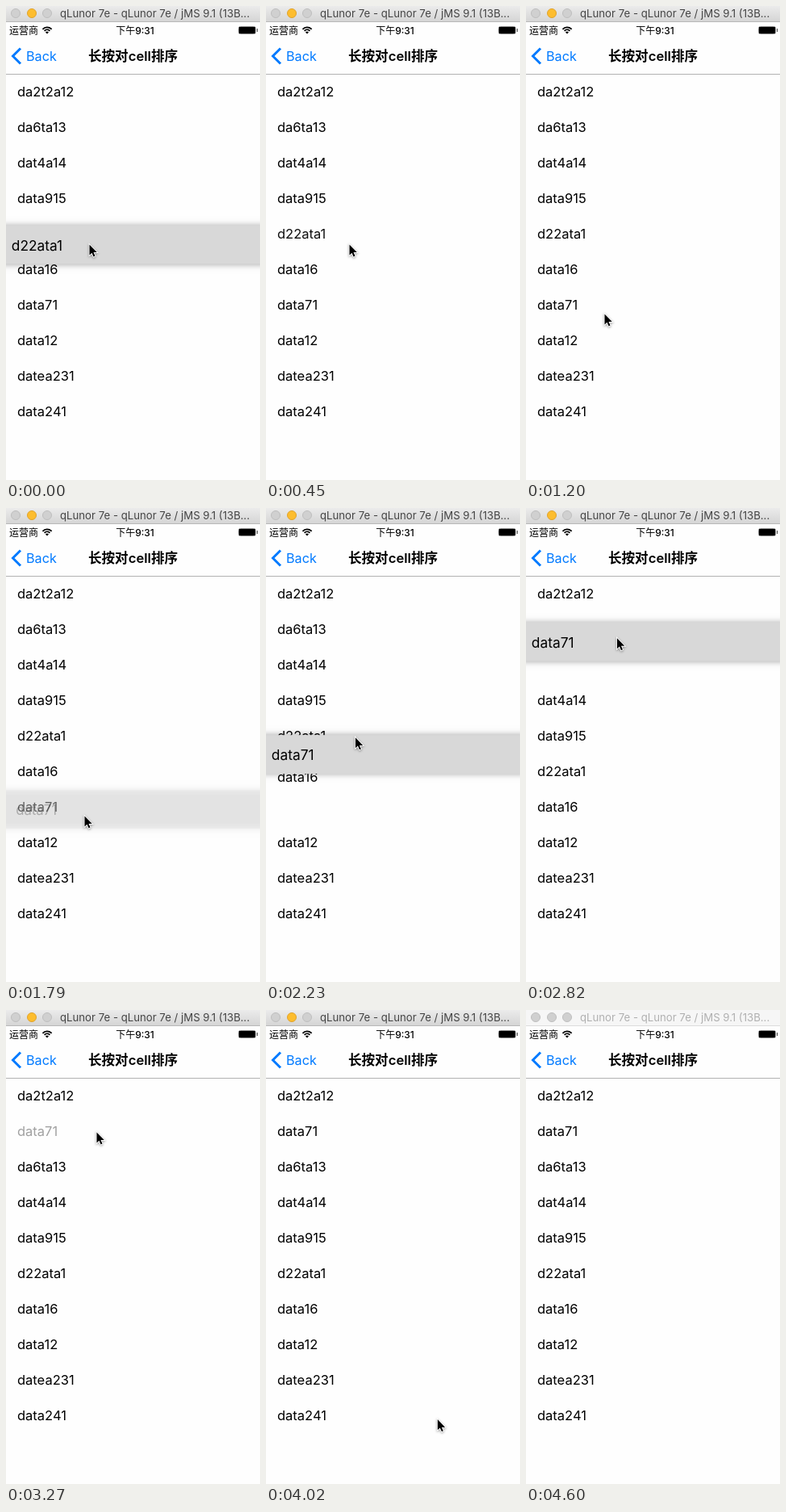
An HTML page with a canvas that plays this animation: 315 by 587 pixels, repeating every 4.7 s.

```html
<!DOCTYPE html>
<html lang="zh">
<head>
<meta charset="utf-8">
<title>Cell sorting</title>
<style>
html, body { margin: 0; height: 100%; overflow: hidden; background: #fefefe; }
canvas { display: block; }
</style>
</head>
<body>
<canvas id="stage" width="315" height="587"></canvas>
<script>
const c = document.getElementById('stage').getContext('2d');
const FONT = 'Inter, "Noto Sans CJK SC", "Noto Sans CJK", sans-serif';
const LOOP = 4700, STEP = 148.6, W = 315, ROW = 44, TOP = 106, SIZE = 16.5;
const SLIDE = 273, FADE = 250;
const DROP_1 = 290, LIFT = 1701, DROP_2 = 3260;
const FIRST = 'd22ata1', SECOND = 'data71';

const names = ['da2t2a12', 'da6ta13', 'dat4a14', 'data915', FIRST,
  'data16', SECOND, 'data12', 'datea231', 'data241'];

// when each row starts to slide one slot down
const slides = { data16: 2160, d22ata1: 2240, data915: 2314, dat4a14: 2441, da6ta13: 2776 };

const clamp = p => Math.min(1, Math.max(0, p));
const mix = (a, b, p) => a + (b - a) * p;
const smooth = p => p * p * (3 - 2 * p);
const out = k => p => 1 - (1 - p) ** k;

// pointer strokes, each from the end of the one before
const start = { x: 103.5, y: 295.5 };
const strokes = [
  { at: 827, dur: 312, x: 97.5, y: 381.5, ex: smooth, ey: out(1.84) },
  { at: 2080, dur: 446, x: 116.5, y: 197, ex: out(3), ey: out(1.84) },
  { at: 2526, dur: 446, x: 112.5, y: 151.5, ex: out(2), ey: out(1.4) },
  { at: 3715, dur: 446, x: 248, y: 561.5, ex: smooth, ey: out(1.84) },
];

function tip(t) {
  let { x, y } = start;
  for (const s of strokes) {
    const p = clamp((t - s.at) / s.dur);
    x = mix(x, s.x, s.ex(p));
    y = mix(y, s.y, s.ey(p));
  }
  return { x, y };
}

function text(s, x, y, size, color = '#000', weight = 400, align = 'left') {
  c.font = `${weight} ${size}px ${FONT}`;
  c.textAlign = align;
  c.fillStyle = color;
  c.fillText(s, x, y);
}

function rect(x, y, w, h, color) {
  c.fillStyle = color;
  c.fillRect(x, y, w, h);
}

function titleBar(active) {
  const g = c.createLinearGradient(0, 0, 0, 20);
  g.addColorStop(0, active ? '#ebebeb' : '#f6f6f6');
  g.addColorStop(1, active ? '#d4d4d4' : '#f6f6f6');
  rect(0, 0, W, 20, g);
  rect(0, 19, W, 1, active ? '#b8b8b8' : '#dcdcdc');
  [12, 32, 51].forEach((x, i) => {
    const lit = active && i === 1;
    c.beginPath();
    c.arc(x, 9, 5.5, 0, 7);
    c.fillStyle = lit ? '#fdbd2e' : '#d0d0d0';
    c.fill();
    c.lineWidth = 1;
    c.strokeStyle = lit ? '#e0a32c' : '#bebebe';
    c.stroke();
  });
  text('qLunor 7e - qLunor 7e / jMS 9.1 (13B...', 67, 14, 13.2, active ? '#444' : '#b0b0b0');
}

function header() {
  text('运营商', 4, 34.5, 12);
  text('下午9:31', 160, 34.5, 12, '#000', 500, 'center');
  c.strokeStyle = '#000';
  c.lineWidth = 1.8;
  for (const r of [4.6, 7.6]) {
    c.beginPath();
    c.arc(51, 34, r, -Math.PI * .76, -Math.PI * .24);
    c.stroke();
  }
  c.beginPath();
  c.moveTo(51, 34.5);
  c.arc(51, 34.5, 2.8, -Math.PI * .76, -Math.PI * .24);
  c.fill();

  c.lineWidth = 1;
  c.strokeStyle = '#888';
  c.beginPath();
  c.roundRect(288.5, 25.5, 21, 9, 2);
  c.stroke();
  rect(289, 26, 20, 8, '#000');
  rect(311, 28, 1, 4, '#444');

  c.strokeStyle = '#007aff';
  c.lineWidth = 3;
  c.beginPath();
  c.moveTo(18, 52.5);
  c.lineTo(8.5, 62);
  c.lineTo(18, 71.5);
  c.stroke();
  text('Back', 25, 68, 16.2, '#007aff');
  text('长按对cell排序', 157.5, 68, 16.6, '#000', 600, 'center');
  rect(0, 84, W, 1, '#b2b2b2');
}

function opacity(name, t, lift) {
  if (name === FIRST) return clamp((t - DROP_1 + 80) / FADE);
  if (name !== SECOND) return 1;
  return t < DROP_2 ? 1 - lift : clamp((t - DROP_2 + 83) / FADE);
}

function rows(t, lift) {
  names.forEach((name, i) => {
    const p = (t - slides[name]) / SLIDE || 0;
    const slot = name === SECOND && t > DROP_2 ? 1 : i + smooth(clamp(p));
    const y = TOP + slot * ROW;
    c.globalAlpha = opacity(name, t, lift);
    text(name, 14, y + 6, SIZE);
    c.globalAlpha = 1;
    // the separator flashes as a slide settles
    if (p > .8 && p < 1.1) rect(14, Math.round(y + 21), W - 14, 1, '#c4c4c6');
  });
}

function liftedCell(name, y, lift) {
  const scale = 1 + .05 * lift;
  c.save();
  c.globalAlpha = lift;
  c.shadowColor = 'rgba(0,0,0,.35)';
  c.shadowBlur = 8;
  rect(-8, y - 24, W + 16, 48, '#d8d8d8');
  c.shadowColor = 'transparent';
  c.translate(W / 2, y);
  c.scale(scale, scale);
  text(name, 14 - W / 2, 6.7, SIZE);
  c.restore();
}

const arrow = new Path2D('M0 0V13L3 10.3L5.1 15L7 14.1L5 9.6H9.3Z');

function pointer({ x, y }) {
  c.save();
  c.translate(x, y);
  c.lineWidth = 1.8;
  c.strokeStyle = '#fff';
  c.shadowColor = 'rgba(0,0,0,.4)';
  c.shadowBlur = 3;
  c.shadowOffsetY = 1;
  c.stroke(arrow);
  c.shadowColor = 'transparent';
  c.fillStyle = '#000';
  c.fill(arrow);
  c.restore();
}

function draw(now) {
  const time = now % LOOP;
  // the screen refreshes in even steps
  const t = Math.floor((time + 5.6) / STEP) * STEP;
  const lift = smooth(clamp((t - LIFT) / FADE));
  rect(0, 0, W, 587, '#fefefe');
  rows(t, lift);
  if (t < DROP_1) liftedCell(FIRST, start.y, 1);
  if (lift && t < DROP_2) {
    // the cell trails the pointer a little
    const y = mix(TOP + 6 * ROW, tip(t - 35).y + 1, lift);
    liftedCell(SECOND, y, lift);
  }
  header();
  titleBar(time < 4600);
  if (t < 4300) pointer(tip(t));
  requestAnimationFrame(draw);
}
draw(0);
</script>
</body>
</html>
```
